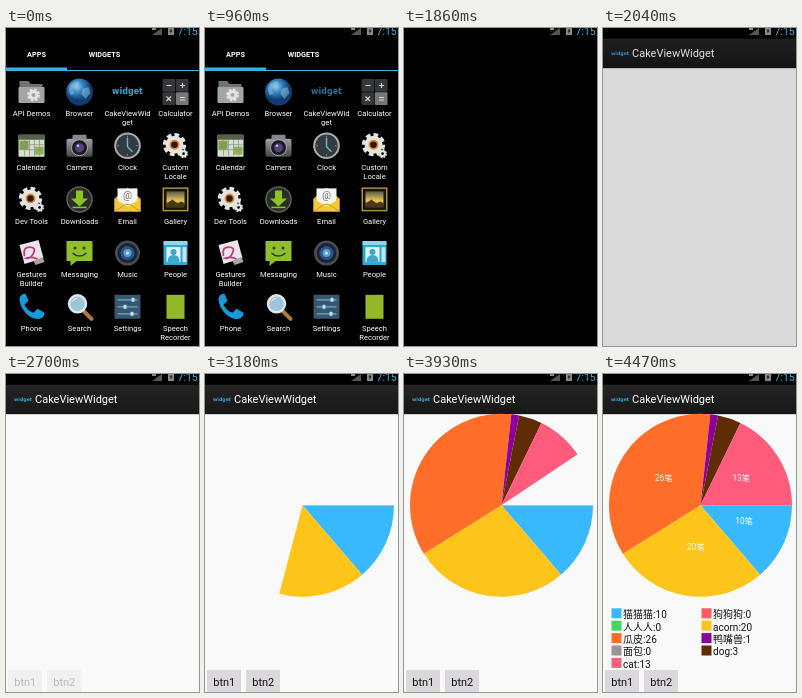
Recreate the animation shown at these times as an HTML page. Size 193 px wide and 318 px high, loop 5850 ms.

```html
<!DOCTYPE html>
<html lang="en">
<head>
<meta charset="utf-8">
<title>Pie chart widget demo</title>
<style>
  html, body { margin: 0; width: 100%; height: 100%; overflow: hidden; background: #000; }
  svg { display: block; width: 193px; height: 318px; font-family: Roboto, "Noto Sans CJK SC", "Noto Sans CJK", sans-serif; }
  .mid { text-anchor: middle; }
  .brand { font-family: "DejaVu Sans", sans-serif; font-weight: bold; fill: #33a5de; }

  #home, #press, #page, #buttons, #pie, #detail { animation: 5850ms step-end infinite; }
  #home { transform-origin: 96.5px 164px; animation-name: home; }
  #press { animation-name: press; }
  #page { animation-name: page; }
  #buttons { animation-name: buttons; }
  #pie { animation-name: pie; }
  #detail { animation-name: detail; }
  #sweep { animation: sweep 5850ms linear infinite; }

  @keyframes press { 0% { opacity: 1 } 16.41% { opacity: .7 } 23.59%, 100% { opacity: .4 } }
  @keyframes home {
    0% { opacity: 1; transform: none }
    27.18% { opacity: .58; transform: scale(.978) }
    27.69% { opacity: .15; transform: scale(.955) }
    31.79%, 100% { opacity: 0; transform: scale(.95) }
  }
  @keyframes page { 0% { opacity: 0 } 34.87% { opacity: .88 } 35.38%, 100% { opacity: 1 } }
  @keyframes buttons { 0% { opacity: 0 } 46.15% { opacity: .27 } 47.69%, 100% { opacity: 1 } }
  @keyframes pie { 0% { opacity: 0 } 51.79%, 100% { opacity: 1 } }
  @keyframes sweep {
    0%, 50.6% { stroke-dashoffset: 360; animation-timing-function: cubic-bezier(.333, .667, .667, 1) }
    74.53%, 100% { stroke-dashoffset: 0 }
  }
  @keyframes detail {
    0% { opacity: 0 } 72.82% { opacity: .25 } 74.02% { opacity: .5 }
    75.21% { opacity: .75 } 76.41%, 100% { opacity: 1 }
  }
</style>
</head>
<body>
<svg viewBox="0 0 193 318">
  <defs>
    <linearGradient id="bar" x2="0" y2="1">
      <stop stop-color="#242424"/><stop offset="1" stop-color="#171717"/>
    </linearGradient>
    <radialGradient id="globe" cx=".4" cy=".3">
      <stop stop-color="#8fd0f2"/><stop offset=".5" stop-color="#2f80bd"/><stop offset="1" stop-color="#123c70"/>
    </radialGradient>
    <linearGradient id="steel" x2="0" y2="1">
      <stop stop-color="#a0a2a4"/><stop offset="1" stop-color="#45484a"/>
    </linearGradient>
    <linearGradient id="sunset" x2="0" y2="1">
      <stop stop-color="#5a5a50"/><stop offset=".6" stop-color="#f0c850"/><stop offset="1" stop-color="#3a2a12"/>
    </linearGradient>
    <mask id="reveal" maskUnits="userSpaceOnUse" x="0" y="30" width="193" height="200">
      <circle id="sweep" cx="97.5" cy="131.3" r="47" fill="none" stroke="#fff" stroke-width="94" pathLength="360" stroke-dasharray="360 360"/>
    </mask>
    <g id="gear" fill="none" stroke="#e4e4e0">
      <circle r="8.6" stroke-width="4.4" pathLength="80" stroke-dasharray="6 4"/>
      <circle r="5.8" stroke-width="5"/>
    </g>
  </defs>

  <g id="home">
    <g class="mid" font-size="7.3" font-weight="bold" fill="#fff">
      <text x="30.5" y="29">APPS</text>
      <text x="98.5" y="29">WIDGETS</text>
    </g>
    <path d="M0 39.5h61v2.5h132v1H0z" fill="#33b5e5"/>
    <g id="apps" class="mid" font-size="7.6" fill="#fff"></g>
  </g>

  <g id="page">
    <path d="M0 10h193v308H0z" fill="#f9f9f9"/>
    <path d="M0 11h193v29H0z" fill="url(#bar)"/>
    <path d="M0 10h193v1H0z" fill="#0c0c0c"/>
    <path d="M0 40h193v1H0z" fill="#d0d0d0"/>
    <text class="brand" x="8" y="27" font-size="4.7">widget</text>
    <text x="29" y="29.3" font-size="11" fill="#fff">CakeViewWidget</text>
    <g id="pie"><g id="slices" mask="url(#reveal)"></g></g>
    <g id="detail">
      <g id="counts" class="mid" font-size="8.4" fill="#fff"></g>
      <g id="legend" font-size="10" fill="#111"></g>
    </g>
    <g id="buttons" font-size="11" fill="#111">
      <path d="M2 296h34v22H2zM41 296h34v22H41z" fill="#dad8da"/>
      <text class="mid" x="19.3" y="311.5">btn1</text>
      <text class="mid" x="58.3" y="311.5">btn2</text>
    </g>
  </g>

  <path d="M0 0h193v10H0z"/>
  <path d="M156 0v7h-10z" fill="#555"/>
  <path d="M146 0h4v2h-4z" fill="#888"/>
  <path d="M162 0h6v7h-6z" fill="#8a8a8a"/>
  <path d="M165.5 0l-2 3.5h1.4l-.6 2.5 2.3-3.5h-1.4z" fill="#111"/>
  <text x="171.5" y="7" font-size="10.5" fill="#33b5e5">7:15</text>
</svg>

<script>
  const fill = (id, html) => { document.getElementById(id).innerHTML = html; };
  const shape = (d, color, more = '') => `<path d="${d}" fill="${color}" ${more}/>`;
  const line = (d, color, width, more = '') => shape(d, 'none', `stroke="${color}" stroke-width="${width}" ${more}`);
  const disc = (x, y, r, color, more = '') => `<circle cx="${x}" cy="${y}" r="${r}" fill="${color}" ${more}/>`;
  const box = (x, y, w, h, color, r = 0) => `<rect x="${x}" y="${y}" width="${w}" height="${h}" rx="${r}" fill="${color}"/>`;
  const gear = '<use href="#gear"/>';
  const orangeGear = `<g transform="translate(-1 -1) scale(1.08)">${gear}${disc(0, 0, 3.8, '#2a1808', 'stroke="#e88a2a" stroke-width="1.6"')}</g>`
    + `<g transform="translate(8 8) scale(.42)">${gear}</g>`;

  const apps = [
    ['API Demos', shape('M-12-11h9l2 3h12v17h-23z', '#707375') + box(-13, -5, 26, 16, '#a2a5a6', 1)
      + `<g transform="translate(2 3) scale(.6)">${gear}</g>`],
    ['Browser', disc(0, 0, 13.5, 'url(#globe)')
      + shape('M-9-7q5-5 9-3l-2 5-5 2 2 5-4 1q-3-5 0-10zM3-3l6-2 2 6-5 6-4-5z', '#8fc0d4', 'opacity=".55"')],
    ['CakeViewWid|get', '<text id="press" class="brand" y="2" font-size="8">widget</text>'],
    ['Calculator', [0, 1, 2, 3].map(i => box(-13 + i % 2 * 13.3, -13 + (i >> 1) * 13.3, 12.7, 12.7, i == 3 ? '#75787a' : '#343638', 1)).join('')
      + line('M-9-6.5h5M4.5-6.5h5M7-9v5M-9 4.5l4.5 4.5M-4.5 4.5l-4.5 4.5M4.5 5.5h5M4.5 8h5', '#d8d8d8', 1.1)],
    ['Calendar', box(-13, -11, 26, 22, '#d9ddd2', 1) + box(-13, -11, 26, 5, '#55604a', 1)
      + box(-12, -5, 9, 9, '#7da43c') + box(3, 1, 9, 8, '#8fb54e')
      + line('M-12-1h24M-12 4h24M-7-6v16M-2-6v16M3-6v16M8-6v16', '#8d9484', .8)],
    ['Camera', box(-13, -7, 26, 18, 'url(#steel)', 2) + box(-7, -11, 14, 5, '#85878a', 1)
      + disc(0, 2, 8, '#1c1a24', 'stroke="#a8aaac"') + disc(0, 2, 4.5, '#57407e') + disc(-1.5, 0, 1.3, '#c8b8e8')],
    ['Clock', disc(0, 0, 12.3, '#343a40', 'stroke="#a8adb0" stroke-width="2"') + line('M0-8v9l5 5', '#5cc0d4', 1.4)
      + line('M0-10v1.5M0 8.5v1.5M-10 0h1.5M8.5 0h1.5', '#8c98a0', 1)],
    ['Custom|Locale', orangeGear],
    ['Dev Tools', orangeGear],
    ['Downloads', disc(0, 0, 12.5, '#2a2d28', 'stroke="#5c625c" stroke-width="1.5"')
      + shape('M-3.5-9h7v8h5l-8.5 8-8.5-8h5z', '#8cc424') + line('M-7 8h14', '#8cc424', 1.5)],
    ['Email', shape('M-13-1L0-12 13-1v13h-26z', '#d9a520') + box(-10, -11, 20, 18, '#f6f6f4')
      + '<text y="0" font-size="10" fill="#777">@</text>'
      + shape('M-13-1L0 7 13-1v13h-26z', '#f3c83c') + line('M-13 12L-2 5h4l11 7', '#c9951c', 1)],
    ['Gallery', box(-13, -12, 26, 24, '#b08c3c') + box(-11.5, -10.5, 23, 21, '#16140f') + box(-9, -8, 18, 16, 'url(#sunset)')
      + shape('M-9 4l6-4 5 4 4-2 3 2v4h-18z', '#4a3818')],
    ['Gestures|Builder', shape('M-12-8L7-13l5 18-19 6z', '#e9e5e8')
      + line('M-7 3q-2-9 5-9t4 6-7 5q6-2 11 1', '#c43a83', 1.8) + shape('M2 8l9-4 2 5-9 3z', '#a9a2a0')],
    ['Messaging', shape('M-13-12h26v20H-3l-6 5v-5h-4z', '#8fbe2e') + disc(-4.5, -5, 1.5, '#2f4410') + disc(4.5, -5, 1.5, '#2f4410')
      + line('M-7 0q7 6 14 0', '#2f4410', 1.4)],
    ['Music', disc(0, 0, 12.5, '#484c54') + disc(0, 0, 10, '#1c2434') + disc(0, 0, 7, '#2a5488') + disc(0, 0, 4, '#5c9ad8') + disc(0, 0, 1.6, '#bfe5ff')],
    ['People', box(-12, -12, 24, 24, '#2fa8d0', 1) + box(-12, -12, 24, 4, '#8ed6ea', 1) + box(-9, -6, 14, 15, '#e4f2f6')
      + disc(-2, -1, 3, '#3ba9cc') + shape('M-8 9q0-7 6-7t6 7z', '#3ba9cc') + box(7, -6, 4, 15, '#bfe4ee')],
    ['Phone', shape('M-12-8q1-5 6-5l3 7-4 4q3 6 9 8l4-4 7 4q0 5-5 6-8 1-14-6T-12-8z', '#159bdc')],
    ['Search', line('M4 4l8 8', '#b07a3c', 4, 'stroke-linecap="round"') + disc(-2, -3, 8.5, '#9cc4da', 'stroke="#e2e6e8" stroke-width="2.5"')
      + shape('M-8-4q2-6 8-5-5 1-8 5z', '#e7f5fd')],
    ['Settings', box(-13, -12, 26, 24, '#3a556c', 1) + line('M-10-7h20M-10 0h20M-10 7h20', '#58b4e0', 1.3)
      + box(4, -9, 3, 4, '#b8e2f6') + box(-4, -2, 3, 4, '#b8e2f6') + box(3, 5, 3, 4, '#b8e2f6')],
    ['Speech|Recorder', box(-9, -12, 18, 24, '#93b929')],
  ];

  fill('apps', apps.map(([name, icon], i) => {
    const x = 25.5 + i % 4 * 48, y = 64 + Math.floor(i / 4) * 53.7;
    const label = name.split('|').map((s, n) => `<text y="${24.3 + n * 9}">${s}</text>`).join('');
    return `<g transform="translate(${x} ${y})">${icon}${label}</g>`;
  }).join(''));

  const data = [
    ['猫猫猫', 10, '#38b9fd'], ['狗狗狗', 0, '#ff5a62'],
    ['人人人', 0, '#42d85c'], ['acorn', 20, '#fdc51a'],
    ['瓜皮', 26, '#ff6e29'], ['鸭嘴兽', 1, '#8e009c'],
    ['面包', 0, '#969696'], ['dog', 3, '#5f2c05'],
    ['cat', 13, '#ff5c7d'],
  ];
  const radius = 91.5;
  const total = data.reduce((sum, d) => sum + d[1], 0);
  const at = (v, r) => {
    const a = v / total * 2 * Math.PI;
    return [97.5 + r * Math.cos(a), 131.3 + r * Math.sin(a)];
  };

  let start = 0, slices = '', counts = '', legend = '';
  data.forEach(([name, value, color], i) => {
    if (value) slices += shape(`M97.5 131.3L${at(start, radius)}A${radius} ${radius} 0 0 1 ${at(start + value, radius)}z`, color);
    if (value > 5) {
      const [x, y] = at(start + value / 2, radius / 2);
      counts += `<text x="${x + 2}" y="${y - .2}">${value}笔</text>`;
    }
    const x = 8.5 + i % 2 * 90, y = 234.3 + (i >> 1) * 12.4;
    legend += box(x, y, 10, 10, color) + `<text x="${x + 11.6}" y="${y + 9.9}">${name}:${value}</text>`;
    start += value;
  });
  fill('slices', slices);
  fill('counts', counts);
  fill('legend', legend);
</script>
</body>
</html>
```
